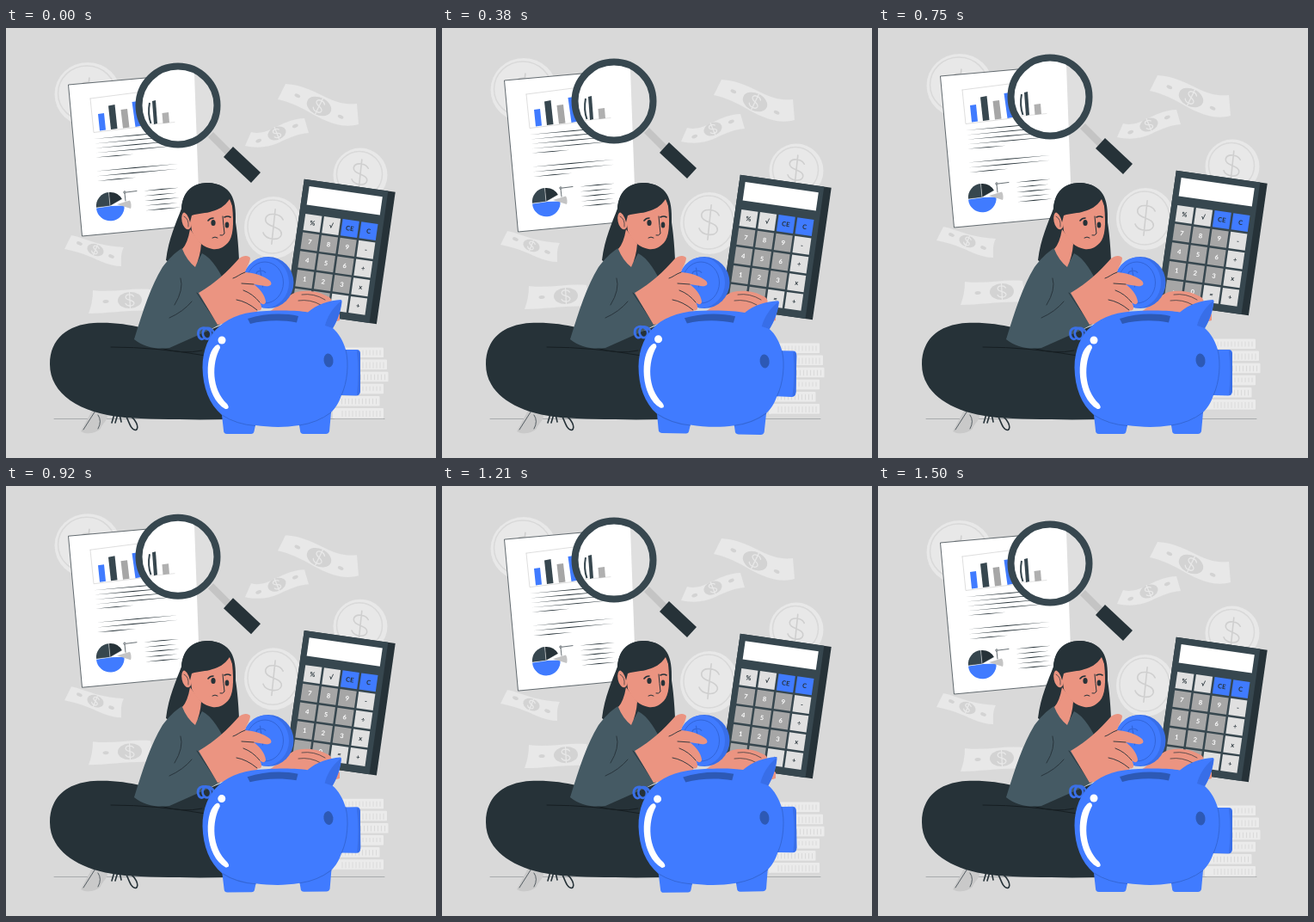
An HTML page for the animation above (1540 ms loop, 500 px wide and 500 px high).

```html
<!DOCTYPE html>
<html lang="en">
<head>
<meta charset="utf-8">
<title>Saving money</title>
<style>
  html, body { margin: 0; width: 100%; height: 100%; overflow: hidden; background: #d9d9d9; }
  svg { display: block; width: 100vw; height: 100vh; }
  text { font-family: Lato, "Open Sans", sans-serif; text-anchor: middle; }
  .ln { fill: none; stroke: #263238; stroke-linecap: round; stroke-linejoin: round; }
  .blue { fill: #407bff; }
  .shade { fill: #386ee8; }
  .dark { fill: #263238; }
  .skin { fill: #eb9481; }
  .navy { fill: #2d59b5; }
</style>
</head>
<body>
<svg viewBox="0 0 500 500">
  <rect width="500" height="500" fill="#d9d9d9"/>
  <path class="ln" d="M56 454.500H440" stroke-width=".6" opacity=".45"/>

  <g id="float">
    <g id="money"></g>
    <g id="stack"></g>

    <g id="paper">
      <path d="M72.500 66L219 53L224 190L231 229L88.500 242Z" fill="#fff"/>
      <path class="ln" d="M219 53L72.500 66L88.500 242L200 231.500" stroke-width=".7"/>
      <path class="ln" d="M98 82L102 121.500L196 110M98 82L160 74" style="stroke:#c8c8c8" stroke-width=".6"/>
      <path class="blue" d="M107 100L114 99L116 118.500L109 119.500ZM146.500 86L154 85L158 113.500L150.500 115Z"/>
      <path fill="#37474f" d="M119 90.500L126.500 89L129.500 117L122 118Z"/>
      <path fill="#a6a6a6" d="M133.500 95L141 94L143.500 115.500L136 116.500Z"/>
      <g id="lines" class="dark"></g>
      <path fill="#37474f" d="M121 207L105 209A16 16 0 0 1 119.500 191Z"/>
      <path class="dark" d="M121 207L119.500 191A16 16 0 0 1 135 199Z"/>
      <path class="blue" d="M121 207L137.500 206.500A16.300 16.300 0 0 1 105 209.500Z"/>
      <path fill="#c4c4c4" d="M129 205L144 200.500Q146.500 205 145 210Z"/>
      <path d="M105 209L121 207L135 199M121 207L119.500 191" fill="none" stroke="#fff" stroke-width=".5"/>
      <path class="ln" d="M139 201L138 192M140 191L152 189.500" stroke-width=".7"/>
      <circle cx="138" cy="191" r="1.200" fill="#fff" stroke="#263238" stroke-width=".7"/>
    </g>

    <g id="lens">
      <path d="M235 127L241 121L262 142L256 148Z" fill="#c4c4c4"/>
      <path class="dark" d="M264 138L296 168L285 180L253 150Z"/>
      <circle cx="200" cy="90" r="42" fill="#fff" opacity=".15"/>
      <path d="M219 52.500A42 42 0 1 0 219 127.500Z" fill="#fff"/>
      <path class="ln" d="M160 113L196 109.500" style="stroke:#d0d0d0" stroke-width=".6"/>
      <path fill="#37474f" d="M170 85L174 84L176 111L172 112Z"/>
      <path d="M167 87Q164.500 100 168.500 111" fill="none" stroke="#37474f" stroke-width="2"/>
      <path fill="#b0b0b0" d="M181.500 99L189 98L190 110L182.500 111Z"/>
      <circle cx="200" cy="90" r="45.500" fill="none" stroke="#37474f" stroke-width="8"/>
    </g>

    <g transform="translate(346.800 175.700) rotate(8.100)">
      <path class="dark" d="M0 0H107V155H0Z"/>
      <path fill="#37474f" d="M0 0H98.500V155H0Z"/>
      <rect x="7" y="7.500" width="86" height="21.500" fill="#fff"/>
      <g id="keys"></g>
    </g>
  </g>

  <!-- shoe and laces -->
  <path fill="#c9c9c9" d="M101 443L117 447C121 455 112 459 110 466C104 472 92 473 87 469Z"/>
  <path class="ln" d="M90 467L104 445M107 450Q112 457 107 466" stroke-width=".7"/>
  <path class="ln" d="M126 449L123 459M130 449L127 459M132 449L134 458M139 450C143 457 145 468 151 467.500C156 465 150 453 142 450" stroke-width="1.600"/>

  <!-- hair behind the face, left hand, legs -->
  <path class="dark" d="M235 180C214 180 205 193 204 210C198 226 189 245 186 270L215 290L258 312L272 294C271 265 270 245 267 226C268 198 262 182 235 180Z"/>
  <path class="skin" d="M306 330C318 322 326 311 338 307C350 304 364 306 376 313C381 318 378 321 374 323L388 333L388 340L370 345L310 345Z"/>
  <path class="ln" d="M344 310Q358 308 371 316M340 317Q354 315 366 322" stroke-width=".7"/>
  <path class="dark" d="M102 343C125 342 142 345 156 348L235 352L264 340V455C215 456 170 455 138 453C85 448 51 425 51 391C51 361 72 345 102 343Z"/>
  <path class="ln" d="M122 371Q175 371 232 381M180 372Q205 380 228 375" style="stroke:#161e22" stroke-width="1"/>

  <!-- torso and arm -->
  <path fill="#455a64" d="M205 256C196 261 188 270 182 278C168 301 160 327 149 362C160 371 175 374 190 372L235 352L250 344L256 300C250 285 240 268 228 262L220 277Z"/>
  <path class="ln" d="M203 291Q207 304 196 322M190 337Q206 330 216 318M222 308L247 345" stroke-width=".9"/>
  <path class="skin" d="M214 234Q211 251 205 257Q210 270 220 278Q226 266 227 251Z"/>

  <!-- head -->
  <path class="skin" d="M213 212C226 206 246 198 262 198C265 222 265 238 260 247C254 256 246 258 240 257C230 255 222 249 216 236Z"/>
  <ellipse class="skin" cx="210" cy="224" rx="5.500" ry="10.500" transform="rotate(-12 210 224)"/>
  <path class="ln" d="M207 219Q213 222 212 231" stroke-width=".7"/>
  <path class="dark" d="M204 214C204 190 218 180 236 180C255 181 265 193 266 215C264 209 262 204 260 199C254 208 247 211 240 213C232 216 224 215 216 218L214 226Q211 213 204 214Z"/>
  <path class="ln" d="M235 224Q237 221 241 221M254 220Q258 218 261 220" stroke-width="1.600"/>
  <path class="ln" d="M252 219Q253 230 254 239Q252 242 249 241M240 244Q243 242 246 244" stroke-width="1"/>
  <ellipse class="dark" cx="241" cy="226.500" rx="2.600" ry="3.600"/>
  <ellipse class="dark" cx="257" cy="229" rx="2.300" ry="3.500"/>

  <!-- coin and right hand -->
  <ellipse class="shade" cx="305" cy="296" rx="29.500" ry="30"/>
  <ellipse class="blue" cx="302" cy="296" rx="27" ry="29.500"/>
  <ellipse cx="301" cy="296" rx="21.500" ry="24" fill="none" stroke="#3265d8" stroke-width="1"/>
  <g id="sign"></g>
  <path class="skin" d="M224 308C244 296 257 284 271 268C277 263 284 265 284 268C283 275 279 279 278 284C291 285 301 289 307 294C311 299 306 301 301 300L288 298C294 302 301 310 302 318C302 322 298 322 295 319C299 326 297 330 292 328C294 334 288 336 284 335L262 342L246 345Z"/>
  <path class="ln" d="M278 284C272 286 268 290 264 291M288 298L274 297M295 319Q287 309 276 305M292 328Q280 318 268 316" stroke-width=".9"/>

  <g id="pig">
    <path fill="none" stroke="#3a70e8" stroke-width="2.800" stroke-linecap="round" d="M243 362C244 350 234 346 230 351C226 358 234 366 238 359C241 350 228 345 224 352C222 358 226 364 230 361"/>
    <path class="blue" d="M228.500 395C229 353 256 330 303 329C328 328 341 329 351 330.500C362 321 376 317 389 316Q391 316 390.500 319C389 331 385 341 380 349C387 355 392 364 395 374L408 374Q412 374 412 379V422Q412 427.500 407 427.500L390 427C387 436 383 442 378 447L376 469Q375 472 372 472H346Q342 472 342 468L341 462C322 465 305 464 290 462L288.500 469Q288 472 285 472H257Q253 472 253 468L251 450C236 437 229 418 228.500 395Z"/>
    <path class="shade" d="M389 318C379 326 373 337 371 346L380 349C386 338 389 329 390 318Z"/>
    <path class="shade" d="M408 375Q412 375 412 380V422Q411 427 408 427Q411 401 408 375Z"/>
    <path class="navy" d="M281 338C300 332 322 331 340 335L338 342.500C320 339 300 340 284 344Z"/>
    <ellipse class="navy" cx="375" cy="386.500" rx="5.500" ry="8" transform="rotate(-8 375 386.500)"/>
    <path fill="none" stroke="#3467d6" stroke-width="1" d="M251 450Q268 461 290 462.500M341 462Q362 459 378 447M395 374C399 390 397 412 390 427"/>
    <circle cx="251" cy="363" r="4.500" fill="#fff"/>
    <path fill="#fff" d="M243 370C230 382 231 430 255 443C259 443 260 441 257 437C239 420 239 390 249 372C249 368 246 367 243 370Z"/>
  </g>
</svg>
<script>
const $ = id => document.getElementById(id);

const dollar = (x, y, s, color, turn = 0, w = 1.6) =>
  `<path transform="translate(${x} ${y}) rotate(${turn}) scale(${s})" fill="none" stroke="${color}" stroke-width="${w / s}" stroke-linecap="round"
    d="M10 -9C6 -16 -9 -16 -10 -8C-10 2 10 -2 10 8C9 16 -7 16 -11 8M0 -20V20"/>`;

const coin = (x, y, rx, ry, s) =>
  `<ellipse cx="${x}" cy="${y}" rx="${rx}" ry="${ry}" fill="#e8e8e8"/>
   <ellipse cx="${x - 1}" cy="${y - 1}" rx="${rx - 5}" ry="${ry - 5}" fill="none" stroke="#d9d9d9" stroke-width="1.5"/>`
  + dollar(x, y - 1, s, '#cfcfcf', 6);

const dot = (x, y, rx, ry, turn) =>
  `<ellipse transform="translate(${x} ${y}) rotate(${turn})" rx="${rx}" ry="${ry}" fill="#d3d3d3"/>`;

// Banknote: outline, centre medallion, two side marks at distance d along the tilt
function note(path, x, y, r, turn, d) {
  const a = turn * Math.PI / 180, dx = d * Math.cos(a), dy = d * Math.sin(a);
  return `<path d="${path}" fill="#e8e8e8"/>` + dot(x, y, r, r * .68, turn)
    + dot(x - dx, y - dy, 3.5, 2, turn) + dot(x + dx, y + dy, 3.5, 2, turn)
    + dollar(x, y, r / 30, '#e8e8e8', turn, 1.3);
}

$('money').innerHTML =
  coin(95, 77, 38.5, 37, .9) + coin(412, 171, 31.5, 31.5, .85) + coin(311, 232, 34, 36, 1.02) +
  note('M325 65C345 66 360 75 375 82C388 88 398 89 408 88L410 112C392 117 375 110 358 101C343 92 330 86 316 83Z', 364, 91, 15, 26, 28) +
  note('M285 121C300 125 312 115 325 110Q338 105 347 105L352 122C340 123 330 127 318 133C305 139 292 140 278 137Z', 315, 122.5, 11, -22, 23) +
  note('M76 241C86 243 95 247 105 250Q120 254 137 255C133 262 134 270 134 277C120 277 108 270 98 266Q84 260 68 257Z', 104, 258, 10, 22, 20) +
  note('M101 305C125 308 145 302 168 304L172 329C148 327 120 332 96 332Q101 319 101 305Z', 144, 316.5, 14, -3, 28);

$('sign').innerHTML = dollar(297, 290, .55, '#3265d8', -8, 1.2);

// Coin stack with ridges
$('stack').innerHTML = [439, 443, 444.5, 439, 434.5, 439].map((right, i) => {
  const y = 371.5 + i * 14.1;
  let ridges = '';
  for (let x = right - 4; x > 388; x -= 4) ridges += `M${x} ${y + 3}v${5 + (x * 7 + i) % 4}`;
  return `<rect x="380" y="${y}" width="${right - 380}" height="12" rx="1" fill="#ebebeb"/>
    <path d="${ridges}" stroke="#d6d6d6" stroke-width=".8"/>
    <path d="M382 ${y + 12}H${right}" stroke="#d3d3d3" stroke-width=".6"/>`;
}).join('');

// Slanted text rule with tapered ends: x, y, length
const rule = (x, y, w) => {
  const h = w / 2, rise = w * .045;
  return `<path d="M${x} ${y}q${h} ${-rise - 1} ${w} ${-2 * rise}q${-h} ${rise + 1} ${-w} ${2 * rise}"/>`;
};
let rules = '';
for (let i = 0; i < 5; i++) {
  rules += rule(102 + i * .6, 129 + i * 5.4, i < 4 ? 98 : 44);
  rules += rule(160 + i * .5, 189.5 + i * 5.7, i % 2 ? 38 : 41);
}
for (let i = 0; i < 3; i++) rules += rule(105 + i * .6, 166.5 + i * 5.7, i < 2 ? 95 : 45);
$('lines').innerHTML = rules;

$('keys').innerHTML = '% √ CE C 7 8 9 - 4 5 6 ÷ 1 2 3 x . 0 = +'.split(' ').map((label, i) => {
  const col = i % 4, x = 16.8 + col * 21.9, y = 49.3 + (i - col) / 4 * 21.9;
  const digit = /[\d.]/.test(label), clear = label[0] === 'C';
  return `<rect x="${x - 9.7}" y="${y - 9.7}" width="19.4" height="19.4" fill="${clear ? '#407bff' : digit ? '#a6a6a6' : '#e0e0e0'}"/>
    <text x="${x}" y="${y + 2.7}" font-size="7.5" font-weight="700" fill="${digit ? '#fff' : '#263238'}">${label}</text>`;
}).join('');

const LOOP = 1540, LAST = 36;

// 24 steps a second on a 10 ms clock
const step = ms => Math.min(LAST, Math.ceil((Math.floor(ms / 10) + 1) * 6 / 25) - 1);

function draw(ms) {
  const p = step(ms) / LAST;
  const lift = 10 * (1 - Math.abs(1 - 2 * p));
  const sway = p < .25 ? 4 * p : p < .75 ? 2 - 4 * p : 4 * p - 4;
  $('float').setAttribute('transform', `translate(0 ${-lift})`);
  $('pig').setAttribute('transform', `rotate(${sway} 320 394)`);
}

const start = performance.now();
function tick() {
  draw((performance.now() - start) % LOOP);
  requestAnimationFrame(tick);
}
tick();
</script>
</body>
</html>
```
